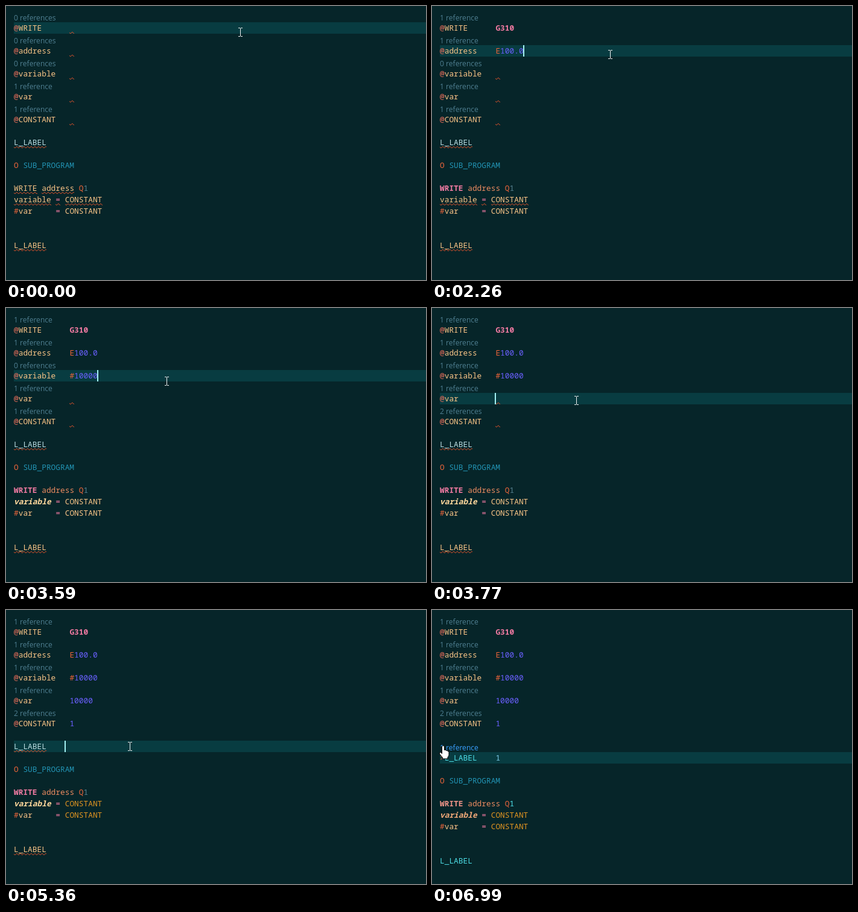
An HTML page with a canvas for the animation above (7390 ms loop, 696 by 455 pixels).

```html
<!DOCTYPE html>
<html lang="en">
<head>
<meta charset="utf-8">
<title>Macro editor</title>
<style>
  html, body { margin: 0; width: 100%; height: 100%; overflow: hidden; background: #062529; }
  canvas { display: block; }
</style>
</head>
<body>
<canvas id="stage" width="696" height="455"></canvas>
<script>
const ctx = document.getElementById('stage').getContext('2d');
const LOOP = 7390, LEFT = 13, ADVANCE = 7.7, ROW = 19, VALUE_COL = 12;
const CODE_FONT = '12.83px "Noto Sans Mono", monospace';
const LENS_FONT = '12.1px "Open Sans", sans-serif';
const C = {
  bg: '#062529', line: '#083c41', lens: '#4f7f91', hover: '#3aa0ff', caret: '#a5f3f5',
  at: '#f2705c', name: '#f9c486', pink: '#f27ba3', orange: '#e9643a', number: '#6b60ff',
  constant: '#df9421', address: '#ec8b60', sub: '#2293b3', plain: '#b9dbe0',
  label: '#4cdce4', dim: '#55808f', italic: '#ffd79c', error: '#e8562c'
};

const SHIFT_AT = 6620, LABEL_AT = 6050, HOME_AT = 5850, PREFIX_AT = 5950;
const entries = {
  1: ['G310', [290, 380, 460, 550]],
  3: ['E100.0', [1380, 1480, 1580, 1780, 1970, 2260]],
  5: ['#10000', [2900, 2900, 2900, 3100, 3310, 3590]],
  7: ['10000', [4150, 4240, 4410, 4590, 4790]],
  9: ['1', [5170]],
  11: ['1', [5650]]
};
const focusRows = [[0, 1], [910, 3], [2640, 5], [3770, 7], [4970, 9], [5360, 11]];
const caretOff = [[0, 290], [1200, 1380], [6910, LOOP]];
const pointer = [
  [0, 388, 43], [910, 295, 80], [2640, 266, 121], [3770, 239, 153], [4970, 222, 190],
  [5360, 205, 226], [6140, 150, 228], [6240, 100, 230], [6340, 62, 232], [6430, 38, 233],
  [6530, 25, 232], [6910, 19, 235]
];
const definitions = [
  // row, name, lens text before and after, time of the lens change
  [1, 'WRITE', '0 references', '1 reference', 910],
  [3, 'address', '0 references', '1 reference', 910],
  [5, 'variable', '0 references', '1 reference', 3770],
  [7, 'var', '1 reference', '1 reference', 0],
  [9, 'CONSTANT', '1 reference', '2 references', 3770]
];

let now = 0;
const after = (time, late, early) => now >= time ? late : early;
const latest = list => list.filter(item => item[0] <= now).pop();
const colX = col => LEFT + col * ADVANCE;
const rowY = row => 8 + ROW * (row + (row >= 11 ? after(SHIFT_AT, 1, 0) : 0));
const typed = row => {
  const [text, times] = entries[row];
  return text.slice(0, times.filter(time => time <= now).length);
};

function code(row, col, text, color, style = '') {
  ctx.font = `${style} ${CODE_FONT}`;
  ctx.fillStyle = color;
  ctx.fillText(text, colX(col), rowY(row) + 14);
}

function lens(y, text, color = C.lens) {
  ctx.font = LENS_FONT;
  ctx.fillStyle = color;
  ctx.fillText(text, LEFT, y + 16);
}

function squiggle(row, col, length) {
  const x = Math.round(colX(col)), y = rowY(row) + 16, width = Math.round(length * ADVANCE);
  ctx.save();
  ctx.beginPath();
  ctx.rect(x, y, width, 3);
  ctx.clip();
  ctx.beginPath();
  ctx.moveTo(x - 1.2, y);
  for (let i = 0; i <= width; i += 6) {
    ctx.lineTo(x + i + 1.8, y + 3);
    ctx.lineTo(x + i + 4.8, y);
  }
  ctx.strokeStyle = C.error;
  ctx.lineWidth = 1;
  ctx.stroke();
  ctx.restore();
}

function drawDefinitions() {
  for (const [row, name, before, later, time] of definitions) {
    lens(rowY(row - 1), after(time, later, before));
    code(row, 0, '@', C.at);
    code(row, 1, name, C.name);
    const value = typed(row);
    if (!value) squiggle(row, VALUE_COL, 1);
    else if (row === 1) code(row, VALUE_COL, value, C.pink, 'bold');
    else if (row === 3 || row === 5) {
      code(row, VALUE_COL, value[0], C.orange);
      const openDot = value.endsWith('.');
      code(row, VALUE_COL + 1, openDot ? value.slice(1, -1) : value.slice(1), C.number);
      if (openDot) {
        code(row, VALUE_COL + 4, '.', C.name);
        if (now >= 2050) squiggle(row, VALUE_COL + 4, 1);
      }
    } else code(row, VALUE_COL, value, C.number);
  }
}

function drawProgram() {
  const prefix = after(PREFIX_AT, 1, 0), hasLabel = now >= LABEL_AT, shifted = now >= SHIFT_AT;
  if (shifted) lens(rowY(11) - ROW, '1 reference', after(6990, C.hover, C.lens));
  if (prefix) code(11, 0, '>', C.orange);
  code(11, prefix, 'L_LABEL', hasLabel ? C.label : C.plain);
  code(11, 11 + prefix, typed(11), hasLabel ? '#7cc9e6' : C.number);
  code(20, 0, 'L_LABEL', hasLabel ? C.label : C.name);
  if (!hasLabel) {
    squiggle(11, prefix, 7);
    squiggle(20, 0, 7);
  }

  code(13, 0, 'O', C.orange);
  code(13, 2, 'SUB_PROGRAM', C.sub);

  const known = now >= 640;
  code(15, 0, 'WRITE', shifted ? '#f09488' : known ? C.pink : C.name, known ? 'bold' : '');
  code(15, 6, 'address', after(1580, C.address, C.name));
  code(15, 14, 'Q', C.orange);
  code(15, 15, '1', shifted ? C.label : C.dim);
  if (!known) {
    squiggle(15, 0, 5);
    squiggle(15, 6, 7);
  }

  const italic = now >= 3210;
  code(16, 0, 'variable', shifted ? '#f0a878' : italic ? C.italic : C.name, italic ? 'italic bold' : '');
  if (now < 3410) [[0, 8], [9, 1], [11, 8]].forEach(([col, length]) => squiggle(16, col, length));
  code(17, 0, '#', C.orange);
  code(17, 1, 'var', C.name);
  for (const row of [16, 17]) {
    code(row, 9, '=', C.pink);
    code(row, 11, 'CONSTANT', after(5260, C.constant, C.name));
  }
}

function drawCaret(row) {
  if (caretOff.some(([from, to]) => now >= from && now < to)) return;
  let col = (row === 11 ? 11 : VALUE_COL) + typed(row).length;
  if (now >= HOME_AT) col = after(PREFIX_AT, 1, 0);
  ctx.fillStyle = C.caret;
  ctx.fillRect(Math.round(colX(col) - 0.05) - 1, rowY(row), 2, ROW);
}

function drawPointer() {
  const [, x, y] = latest(pointer);
  if (now >= 6910) {
    const hand = new Path2D('M16.5 226.5q2-2.5 4 0v6q2-1 3 1q2-1 2.5 1q2-.5 2 2v4q0 2-2 4v2.5h-8.500v-2l-5-6q-.8-3 2-2.500l2 2z');
    ctx.fillStyle = '#fff';
    ctx.strokeStyle = '#000';
    ctx.lineWidth = 1;
    ctx.fill(hand);
    ctx.stroke(hand);
    return;
  }
  ctx.fillStyle = '#f4f4f4';
  ctx.fillRect(x, y - 6, 1, 13);
  for (const edge of [y - 7, y + 7]) {
    ctx.fillRect(x - 3, edge, 3, 1);
    ctx.fillRect(x + 1, edge, 3, 1);
  }
}

function draw() {
  now = performance.now() % LOOP;
  const row = latest(focusRows)[1];
  ctx.fillStyle = C.bg;
  ctx.fillRect(0, 0, 696, 455);
  ctx.fillStyle = C.line;
  ctx.fillRect(LEFT, rowY(row), 696 - LEFT, ROW);
  drawDefinitions();
  drawProgram();
  drawCaret(row);
  drawPointer();
  requestAnimationFrame(draw);
}
draw();
</script>
</body>
</html>
```
